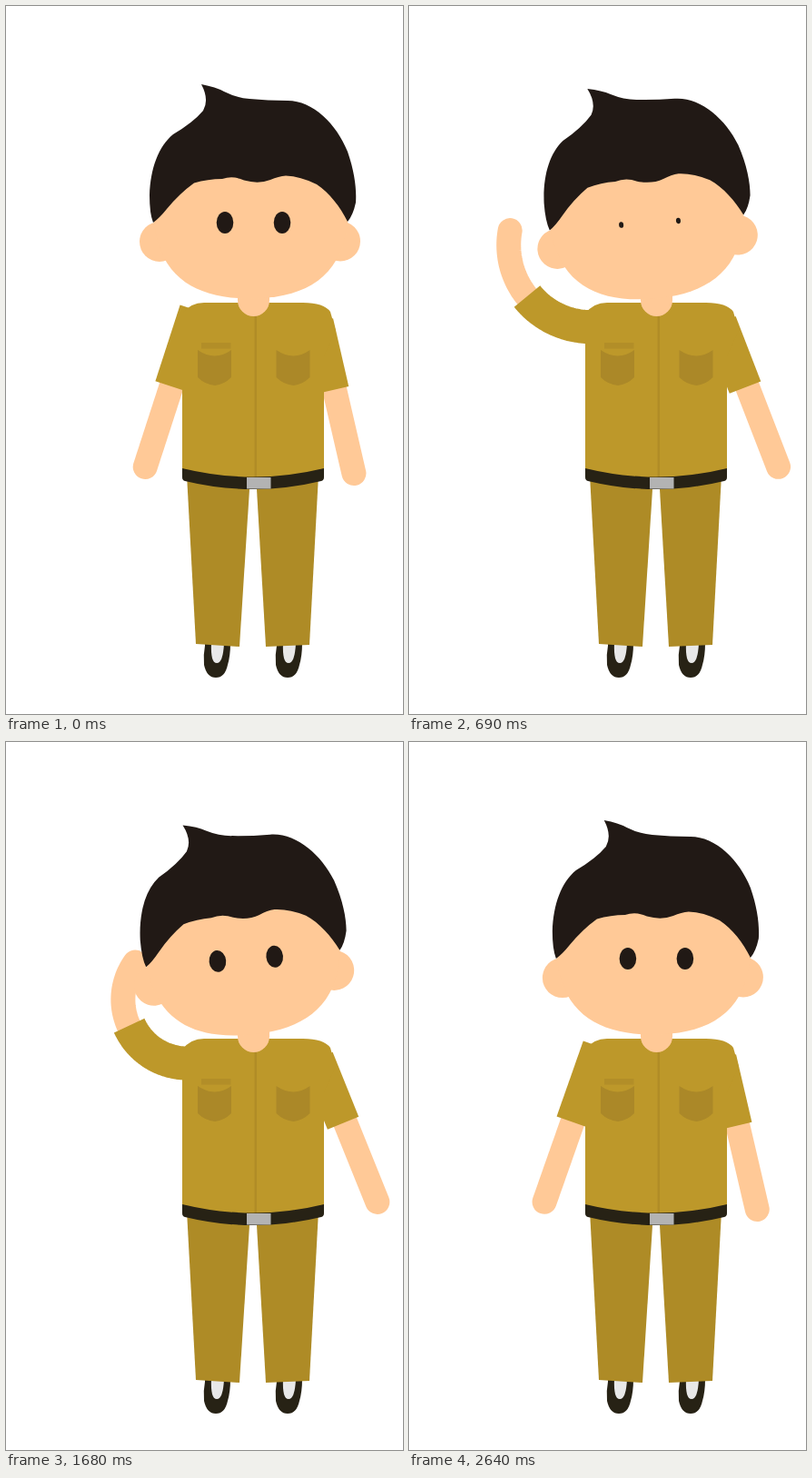
An HTML page for the animation above (2.7 s loop, 437 by 778 pixels).

```html
<!DOCTYPE html>
<html lang="en">
<head>
<meta charset="utf-8">
<title>Salute</title>
<style>
  html, body { margin: 0; width: 100%; height: 100%; overflow: hidden; background: #fff; }
  svg { display: block; width: 437px; height: 778px; }
  .skin { fill: #ffc997; }
  .shirt { fill: #bd982a; }
  .pants { fill: #ae8b26; }
  .pocket { fill: #ab8828; }
  .dark { fill: #272215; }
  .hair { fill: #211915; }
  .limb { fill: none; stroke: #ffc997; stroke-width: 27; stroke-linecap: round; }
  .sleeve { fill: none; stroke: #bd982a; stroke-width: 37; }
</style>
</head>
<body>
<svg viewBox="0 0 437 778">
  <defs>
    <g id="shoe">
      <path class="dark" d="M219 700V703Q217 713 218 724Q221 738 231 738Q241 738 244 724Q247 714 247 700Z"/>
      <path fill="#e8e8e8" d="M226 700Q225 722 232 722Q239 722 240 700Z"/>
    </g>
    <path id="pocket" class="pocket" d="M211 378Q230 391 248 378V408Q240 416 230 417Q219 416 211 408Z"/>
  </defs>

  <use href="#shoe"/>
  <use href="#shoe" x="79"/>
  <path class="pants" d="M199 515L268 515V531L257 704L209 701Z"/>
  <path class="pants" d="M276 531V515H344L334 702L286 704Z"/>

  <path id="hand" class="limb"/>
  <path id="cuff" class="sleeve" stroke-linejoin="round"/>
  <g id="rest">
    <path class="limb" d="M344 395V518"/>
    <path class="sleeve" d="M341.500 347V423.500"/>
  </g>

  <path class="shirt" d="M194 515V338Q203 326 218 326H327Q350 326 357 336L363 357L350 385V515L272 525Z"/>
  <path fill="#b08c26" d="M273.500 335H276V520H273.500Z"/>
  <use href="#pocket"/>
  <use href="#pocket" x="86.500"/>
  <rect x="215" y="370" width="32.500" height="6.500" fill="#b28e28"/>
  <path class="dark" d="M194 508Q272 527 350 508V518Q350 521 347 522Q272 540 197 522Q194 521 194 518Z"/>
  <rect x="265" y="518" width="26.500" height="12.500" fill="#b3b3b3"/>
  <path class="skin" d="M255 312H290V323.500A17.500 17.500 0 0 1 255 323.500Z"/>

  <g id="head">
    <circle class="skin" cx="169" cy="259" r="22"/>
    <circle class="skin" cx="368" cy="258.500" r="22"/>
    <path class="skin" d="M162 220C162 295 205 321.500 269 321.500S377 295 377 220L340 170H200Z"/>
    <path class="hair" d="M215 86Q231 89 240 94Q254 101 268 102Q288 104 310 104C338 104 364 130 376 160C384 183 386 202 385 216Q382 230 376 237C368 221 356 205 342 196Q324 187 308 186.500Q300 187 291 191Q278 196 262 191.500Q250 186 238 190Q222 190 207 194.500Q191 206 177 223Q169 233 162 238Q158 228 158 208C159 178 168 154 184 141Q206 128 217 115Q224 103 215 86Z"/>
    <g class="hair">
      <ellipse id="eyeL" cx="241" cy="238"/>
      <ellipse id="eyeR" cx="304" cy="238"/>
    </g>
  </g>
</svg>
<script>
  const LOOP = 2700, STEP = 30, TURN = 2702;
  const $ = id => document.getElementById(id);
  const rad = deg => deg * Math.PI / 180;
  const part = (t, from, to) => Math.min(1, Math.max(0, (t - from) / (to - from)));
  const inOut = x => (1 - Math.cos(Math.PI * x)) / 2;
  const out = x => Math.sin(Math.PI * x / 2);

  // Traces an arm of constant curvature; angles rise from due left towards up.
  function armPath(x, y, angle, bend, length, from, to) {
    const n = 40, ds = (to - from) / n;
    const heading = s => rad(angle + bend * s / length);
    x -= from * Math.cos(heading(from / 2));
    y -= from * Math.sin(heading(from / 2));
    let d = `M${x} ${y}`;
    for (let i = 0; i < n; i++) {
      const a = heading(from + (i + 0.5) * ds);
      x -= ds * Math.cos(a);
      y -= ds * Math.sin(a);
      d += `L${x.toFixed(2)} ${y.toFixed(2)}`;
    }
    return d;
  }

  function draw(time) {
    const t = Math.min(time, TURN - time);

    const lift = inOut(part(t, 0, 690));
    const fold = out(part(t, 435, 867));
    const settle = inOut(part(t, 870, 1350));
    const arm = [
      207 - 3 * lift - 4 * fold,
      341 + 10 * lift + 2 * fold,
      -72 + 71.5 * lift,
      126 * fold + 2 * settle,
      174 - 20 * fold
    ];
    $('hand').setAttribute('d', armPath(...arm, 45, arm[4]));
    $('cuff').setAttribute('d', armPath(...arm, -7, 81));

    const sway = inOut(part(t, 0, 855));
    $('head').setAttribute('transform', `rotate(${-4.7 * sway} 272 338)`);
    $('rest').setAttribute('transform', `rotate(${-13 - 9 * sway} 344 345)`);

    const blink = Math.max(0.1, inOut(part(Math.abs(t - 607), 0, 238)));
    for (const id of ['eyeL', 'eyeR']) {
      $(id).setAttribute('rx', 9.3 * blink);
      $(id).setAttribute('ry', 12 * blink);
    }
  }

  const start = performance.now();
  function tick() {
    const time = (performance.now() - start) % LOOP;
    draw(Math.min(LOOP - 2 * STEP, Math.floor(time / STEP) * STEP));
    requestAnimationFrame(tick);
  }
  tick();
</script>
</body>
</html>
```
